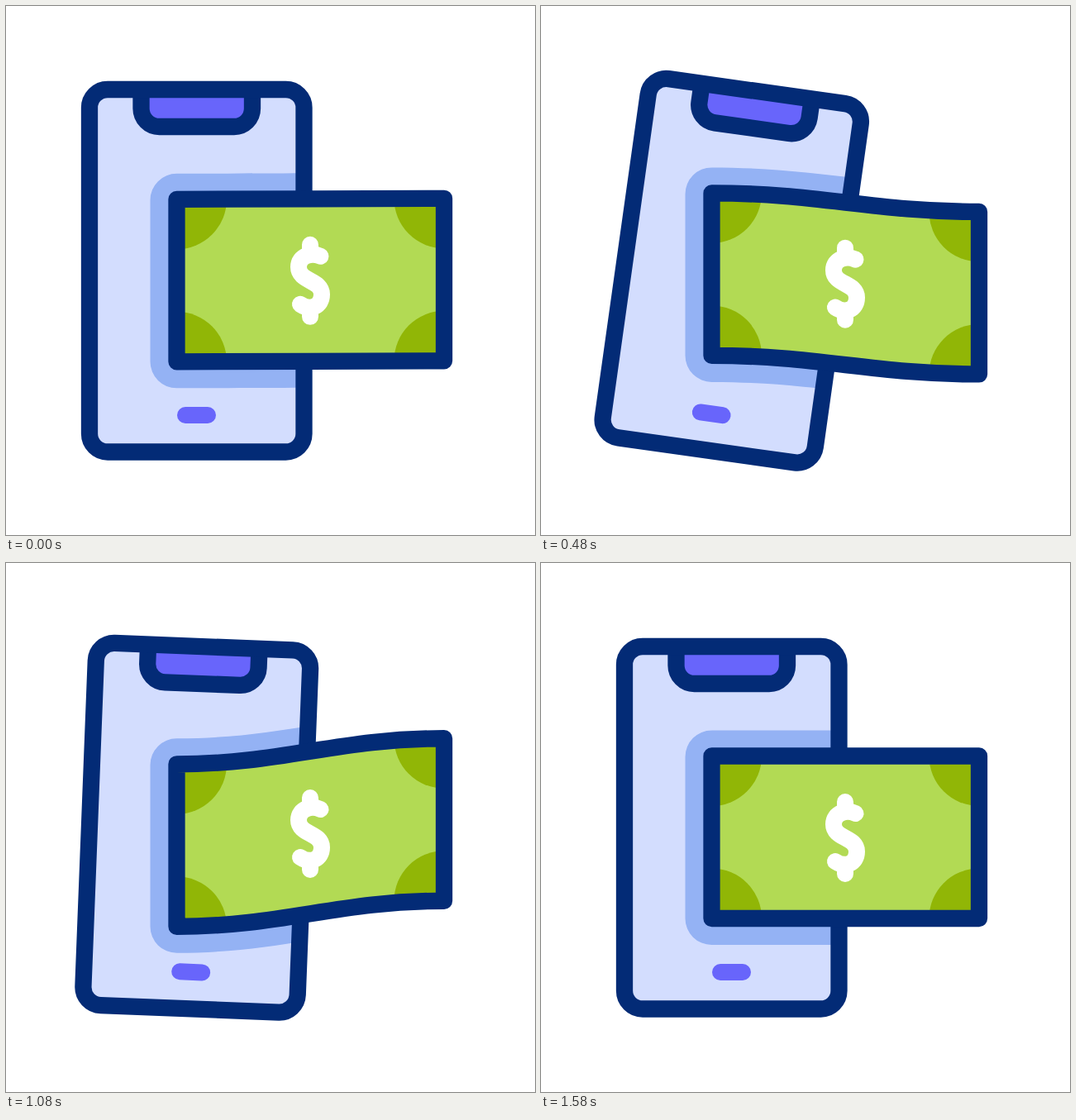
Animation, 640 px wide and 640 px high, one loop 1.6 s. Source, as an HTML page:

```html
<!DOCTYPE html>
<html lang="en">
<head>
<meta charset="utf-8">
<title>Mobile payment</title>
<style>
  html, body { margin: 0; width: 100%; height: 100%; overflow: hidden; background: #fff; }
  svg { display: block; width: 100%; height: 100%; }
  .line { stroke: #032b76; stroke-width: 20.3; stroke-linejoin: round; }
</style>
</head>
<body>
<svg viewBox="0 0 640 640">
  <defs>
    <clipPath id="screen"><rect class="phone" x="101" y="101" width="259.5" height="438.5" rx="22"/></clipPath>
    <clipPath id="note"><path class="bill"/></clipPath>
  </defs>

  <rect class="phone" x="101" y="101" width="259.5" height="438.5" rx="22" fill="#d3ddfe"/>
  <g clip-path="url(#screen)"><path id="shadow" fill="#94b2f4"/></g>
  <g class="phone">
    <path class="line" fill="#6865fb" d="M163.5 101V124a22 22 0 0 0 22 22H276a22 22 0 0 0 22-22V101"/>
    <rect class="line" x="101" y="101" width="259.5" height="438.5" rx="22" fill="none"/>
    <rect x="207" y="485" width="47" height="20" rx="10" fill="#6865fb"/>
  </g>

  <path class="bill" fill="#b2da54"/>
  <g clip-path="url(#note)" fill="#91b606">
    <g id="left"><circle cx="206.5" cy="233.5" r="60.5"/><circle cx="206.5" cy="430" r="60.5"/></g>
    <g id="right"><circle cx="530" cy="233.5" r="60.5"/><circle cx="530" cy="430" r="60.5"/></g>
  </g>
  <path class="bill line" fill="none"/>
  <path id="dollar" fill="none" stroke="#fff" stroke-width="20" stroke-linecap="round"
    d="M380.5 303C370 298 354 302 354 316C354 334 382 331 382 349C382 364 368 369 356 361M368 289V299M368 366V376"/>
</svg>
<script>
const LOOP = 1600;
const LEFT = 206.5, RIGHT = 530, HANDLE = 130;

// [time in ms, value]
const tilt = [[0, 0], [105, 0], [520, 8.2], [880, -4.85], [1140, 3.3], [1345, 0], [LOOP, 0]];
const wave = [[0, 0], [220, -27.2], [620, 27], [1020, -27], [1420, 27], [LOOP, 0]];

const all = selector => document.querySelectorAll(selector);
const set = (selector, name, value) => all(selector).forEach(el => el.setAttribute(name, value));
const shiftY = (selector, dy) => set(selector, 'transform', `translate(0 ${dy})`);

function sample(keys, time) {
  const next = keys.findIndex(key => key[0] > time);
  const [t0, v0] = keys[next - 1], [t1, v1] = keys[next];
  const u = (time - t0) / (t1 - t0);
  return v0 + (v1 - v0) * u * u * (3 - 2 * u);
}

// A band whose long edges bend between the left and right offsets.
function band(top, bottom, dl, dr) {
  return `M${LEFT} ${top + dl}C${LEFT + HANDLE} ${top + dl} ${RIGHT - HANDLE} ${top + dr} ${RIGHT} ${top + dr}` +
    `V${bottom + dr}C${RIGHT - HANDLE} ${bottom + dr} ${LEFT + HANDLE} ${bottom + dl} ${LEFT} ${bottom + dl}`;
}

function draw(now) {
  const time = now % LOOP;
  const dr = sample(wave, (time + 20) % LOOP);
  const dl = -0.46 * dr;
  set('.phone', 'transform', `rotate(${sample(tilt, time)} 230.75 320.25)`);
  set('.bill', 'd', band(233.5, 430, dl, dr) + 'Z');
  set('#shadow', 'd', band(202.5, 462, dl, dr) +
    `a32 32 0 0 1 -32 -32V${234.5 + dl}a32 32 0 0 1 32 -32Z`);
  shiftY('#left', dl);
  shiftY('#right', dr);
  shiftY('#dollar', 0.235 * dr);
}

const start = performance.now();
function frame() {
  draw(performance.now() - start);
  requestAnimationFrame(frame);
}
frame();
</script>
</body>
</html>
```
